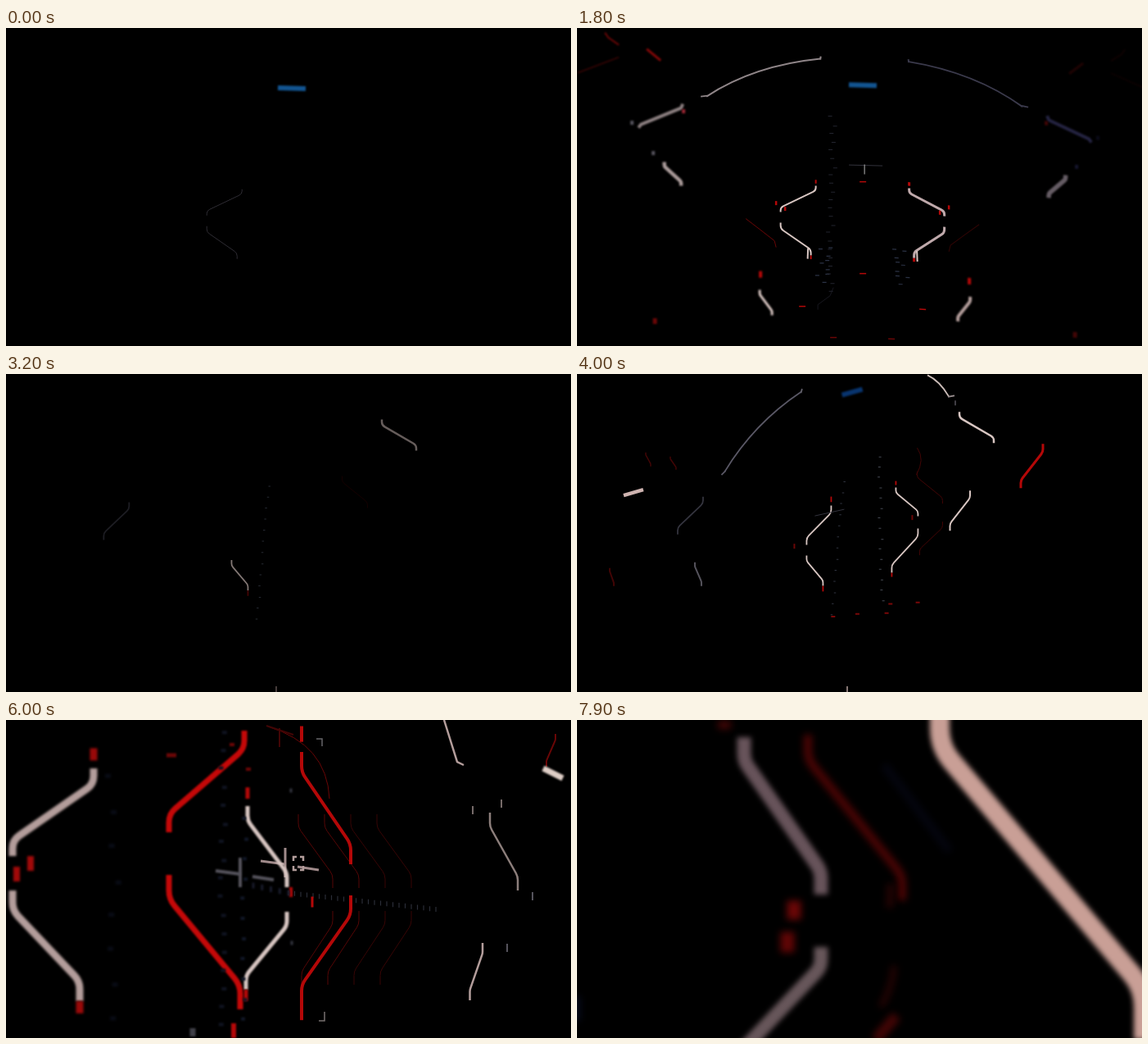
Write an HTML page with a canvas that moves like this. It is 690 by 388 pixels and loops after 8 s.

```html
<!DOCTYPE html>
<html lang="en">
<head>
<meta charset="utf-8">
<title>Light lines</title>
<style>
html, body { margin: 0; width: 100%; height: 100%; overflow: hidden; background: #000; }
canvas { display: block; }
</style>
</head>
<body>
<canvas id="stage" width="690" height="388"></canvas>
<script>
const ctx = document.getElementById('stage').getContext('2d');
const LOOP = 8000, STEP = 100;
const RED = '#b40808', DARK = '#6a0606', DIM = '#420505';
const PINK = '#d8c6c2', ROSE = '#b39d9b', GREY = '#55535c', NAVY = '#141b33', BLUE = '#125490';

let time = 0, piece = 0, wake = [0, 0], bend = 0.18;

const noise = n => { const v = Math.sin(n * 127.1 + 11.7) * 43758.5453; return v - Math.floor(v); };
const clamp = v => Math.max(0, Math.min(1, v));

// Each piece lights up at its own moment inside the wake window, with a short flicker.
function glow() {
  const n = ++piece;
  const age = time - (wake[0] + noise(n) * (wake[1] - wake[0]));
  if (age < 0) return 0;
  const flick = age < 250 ? 0.5 + 0.5 * noise(n + age / STEP) : 1;
  return clamp((age + 60) / 200) * flick;
}

// A depth layer: drifts by (vx, vy) per second and passes its pose at ref.
function layer(ref, vx, vy, soft, draw) {
  const s = (time - ref) / 1000;
  ctx.save();
  ctx.translate(vx * s, vy * s);
  ctx.filter = soft ? `blur(${soft}px)` : 'none';
  draw();
  ctx.restore();
}

// Draws side 0, then its reflection as side 1; skew lowers what lies far from the axis.
function mirror(axis, skew, draw) {
  draw(0);
  ctx.save();
  ctx.transform(-1, -skew, 0, 1, 2 * axis, skew * axis);
  draw(1);
  ctx.restore();
}

function stroke(w, color, trace) {
  ctx.globalAlpha = glow();
  ctx.lineWidth = w;
  ctx.strokeStyle = color;
  ctx.beginPath();
  trace();
  ctx.stroke();
}

function line(w, color, ...p) {
  stroke(w, color, () => { for (let i = 0; i < p.length; i += 2) ctx.lineTo(p[i], p[i + 1]); });
}

function arc(x0, y0, cx, cy, x1, y1, w, color) {
  stroke(w, color, () => { ctx.moveTo(x0, y0); ctx.quadraticCurveTo(cx, cy, x1, y1); });
}

// Upright stub, slanted run, upright stub.
function zig(x0, y0, x1, y1, w, color) {
  const s = (y1 - y0) * bend, r = Math.abs(s);
  stroke(w, color, () => {
    ctx.moveTo(x0, y0);
    ctx.arcTo(x0, y0 + s, x1, y1 - s, r);
    ctx.arcTo(x1, y1 - s, x1, y1, r);
    ctx.lineTo(x1, y1);
  });
}

// Two zigs meeting at a tip, reaching (ux, uy) upwards and (lx, ly) downwards.
function bracket(x, y, gap, ux, uy, lx, ly, w, color, tip) {
  zig(x + ux, y - gap - uy, x, y - gap, w, color);
  zig(x, y + gap, x + lx, y + gap + ly, w, color);
  if (!tip) return;
  const h = uy * 0.14;
  dot(x + ux, y - gap - uy * 1.16, w, h, tip);
  dot(x + lx, y + gap + ly + h / 2, w, h, tip);
}

function dot(x, y, w, h, color) {
  ctx.globalAlpha = glow();
  ctx.fillStyle = color;
  ctx.fillRect(x - w / 2, y - h / 2, w, h);
}

// Marks strung between two points, loosened by a seeded spread.
function row(x0, y0, x1, y1, count, w, h, color, spread = 0) {
  ctx.globalAlpha = glow();
  ctx.fillStyle = color;
  ctx.beginPath();
  for (let i = 0; i < count; i++) {
    const k = i / (count - 1), off = (noise(i + x0) - 0.5) * spread;
    ctx.rect(x0 + (x1 - x0) * k + off - w / 2, y0 + (y1 - y0) * k + off / 3 - h / 2, w, h);
  }
  ctx.fill();
}

function wide() {
  const ref = 1200, vx = 1.9, vy = -2.3;
  wake = [-400, -300];
  layer(ref, 0, -2, 1.2, () => line(6, BLUE, 332, 70.5, 366, 71.5));
  const arms = (w, color, tip) => bracket(247.5, 232.5, 6.5, 43, 32, 37, 40, w, color, tip);
  if (time < 300) {
    layer(ref, vx, vy, 0, () => arms(0.7, '#42404a'));
    return;
  }
  wake = [300, 950];
  layer(ref, vx, vy, 0.4, () => {
    mirror(347.5, 0.05, side => {
      arms(2 + side, [PINK, '#bfa9ab'][side], RED);
      dot(242, 215, 2.5, 5, RED);
      dot(253, 222, 2.5, 5, RED);
      line(2, PINK, 281, 270, 280.5, 283);
      line(1, side ? '#300404' : DARK, 205, 234, 222, 247, 240, 261, 242, 269);
      dot(274, 341, 8, 1.5, RED);
      dot(312, 379, 8, 1.5, DARK);
      row(304, 268, 296, 310, 9, 5, 1.2, '#2b3245', 14);
    });
    mirror(350, 0.065, side => {
      const color = ['#8f8588', '#3b3a4c'][side];
      line(2, color, 296.5, 36, 296, 40);
      arc(296, 39, 215, 47, 157, 85, 2, color);
      line(2, color, 158, 84, 150, 85);
    });
    dot(348, 189, 8, 1.5, RED);
    dot(348, 301, 8, 1.5, RED);
    line(1, '#33333c', 331, 168.5, 372, 169.5);
    line(1.2, '#999', 350, 168, 350, 180);
    row(311, 110, 307, 322, 22, 5, 1, '#23252f', 9);
    line(0.7, '#22222b', 312, 318, 308, 328, 293, 339, 293, 345);
  });
  layer(ref, vx, vy, 0.9, () => mirror(350.5, 0.065, side => {
    line(4, ['#8b7f80', '#242341'][side], 128, 94, 126, 99, 77, 119, 74, 123);
    zig(105.5, 165, 126, 194, 4.5 + side, ['#a99a99', '#655c64'][side]);
    zig(222, 321, 237, 352, 3 + side, [PINK, ROSE][side]);
    dot(66, 117, 4, 5, [GREY, '#0a0a18'][side]);
    dot(92, 154, 4, 5, [GREY, '#15152c'][side]);
    dot(129, 103, 4, 5, ['#9a2633', DIM][side]);
    dot(223, 302, 4, 8, RED);
    dot(94, 359, 5, 7, [DARK, DIM][side]);
    line(2, [DARK, '#100202'][side], 33, 7, 37, 13, 50, 22);
    line(3, ['#820707', '#200303'][side], 84, 27, 101, 41);
    line(1.5, [DIM, '#100202'][side], 50, 37, 0, 56);
  }));
}

function frontal() {
  const axis = 346.5, zoom = 1 + (time - 2300) * 0.000025;
  wake = [1850, 2150];
  ctx.save();
  ctx.translate(axis, 190);
  ctx.scale(zoom, zoom);
  ctx.translate(-axis, -190);
  layer(2300, 0, 0, 1.6, () => mirror(axis, 0, side => {
    line(7, '#c9b5ad', 91, 163.5, 124, 163.5);
    line(8, '#c3aeaa', -10, 216, 47, 222, 38, 240);
    dot(109, 193, 8, 7, '#990808');
    dot(117, 294, 20, 5, '#07152c');
    dot(22, 243, 10, 14, '#250404');
    arc(50, 280, 86, 284, 81, 300, 3, '#250404');
  }));
  layer(2300, 0, 0, 0.8, () => {
    mirror(axis, 0, side => {
      zig(229, 189, 124, 242, 4.5, ['#95888b', '#cdb8b5'][side]);
      zig(111, 258, 187, 325, 5.5, '#c4b0ac');
      dot(229, 191, 5, 6, RED);
      dot(127, 233, 6, 6, RED);
      dot(183, 306, 6, 7, RED);
    });
    arc(533, 312, 662, 310, 690, 282, 2, DIM);
    arc(612, 296, 600, 286, 677, 240, 2, DIM);
  });
  layer(2300, 0, 0, 0.3, () => {
    line(1.6, '#e5e5e5', axis, 79, axis, 90);
    row(axis, 53, axis, 117, 4, 1.5, 2, '#666');
    line(1, '#222a48', 358, 72.5, 393, 72.5);
    dot(axis, 177, 13, 1.6, RED);
    mirror(axis, 0, side => {
      dot(276, 170, 6, 1.5, DIM);
      const color = ['#20294a', '#727b8b'][side];
      for (const y of [208, 221, 237, 273, 294, 319]) dot(265 - (y - 237) * 0.2, y + 0.5, 11, 1.2, color);
      row(243, 232, 249, 232, 3, 1, 5, [NAVY, '#505868'][side]);
      row(235, 270, 241, 270, 3, 1, 5, [NAVY, '#505868'][side]);
      dot(174, 365, 5, 4, RED);
      dot(232, 352, 5, 7, RED);
    });
    row(174, 355, 518, 355, 24, 1.5, 4, '#850808');
    dot(axis, 373, 5, 3, RED);
  });
  ctx.restore();
}

function tilted() {
  const ref = 4900, first = [3000, 3750], second = [4150, 4600];
  wake = first;
  layer(ref, 6, -8, 1, () => line(6, '#08346e', 329, 18.5, 354, 11.5));
  layer(ref, 6.2, -6.8, 0.3, () => {
    wake = first;
    bracket(286, 209, 6.5, 30, 48, 20, 37, 1.8, PINK, RED);
    bracket(422, 175, 7.5, -27, 35, -32, 54, 1.8, PINK, RED);
    arc(279, 16, 222, 54, 186, 113, 1.8, '#5a5866');
    line(1.8, '#62606a', 280.5, 12, 279, 17);
    line(1.8, '#5a5866', 187, 112, 182, 117);
    line(1, '#33333d', 296, 167, 332, 159);
    dot(271, 204, 2, 6, DARK);
    dot(415, 169, 2, 6, DARK);
    row(322, 291, 423, 273, 5, 5, 2, '#780808', 30);
    bracket(452, 163, 11, -31, 39, -28, 41, 1, DIM);
    arc(421, 84, 431, 98, 420, 117, 1, DIM);
    row(331, 125, 318, 288, 13, 2.5, 1, '#303440', 3);
    row(375, 95, 378, 270, 15, 3, 1, '#454953', 4);
    wake = second;
    bracket(358, 136, 9, -27, 36, -38, 58, 2.5, RED);
    bracket(240, 169.5, 8.5, 35, 52, 19.5, 39, 2.5, RED);
    arc(444, 84, 428, 106, 420, 116, 1, DIM);
    row(262, 324, 370, 290, 18, 4, 1.2, '#3a4354', 16);
  });
  layer(ref, 10, -11.5, 0.4, () => {
    wake = first;
    arc(437, -9, 452, -2, 463, 17, 1.8, '#cbbcb8');
    line(1.8, '#9c9192', 462, 17.5, 470, 16);
    zig(476, 36, 518, 74, 2.5, PINK);
    zig(578, 75, 551, 129, 3, RED);
    zig(489, 132, 464.5, 181, 2, PINK);
    dot(471, 25, 1.5, 6, GREY);
    wake = second;
    for (const [x, y] of [[481, 41], [516, 70], [492, 125.5]]) dot(x, y, 2, 6, ROSE);
    zig(635, 99, 607, 156, 1, DIM);
    row(562, 61, 571, 58, 2, 3, 5, NAVY);
  });
  layer(ref, 4.5, -8.5, 0.7, () => {
    wake = first;
    line(4.5, '#ceb3b0', 61, 140.5, 85, 133.5);
    zig(88, 88, 94, 105, 1.5, DIM);
    zig(118, 93, 125, 109, 1.5, DIM);
    zig(44, 229, 49, 251, 2, DIM);
    zig(158, 142, 127, 188, 1.8, '#34343e');
    zig(148, 222, 156, 251, 2, GREY);
    wake = second;
    row(168, 138, 120, 215, 4, 2, 4, '#3b3b44', 16);
    dot(5, 161, 14, 4, DIM);
  });
  wake = first;
  if (time < 4300) dot(330, 385, 1.5, 8, ROSE);
  wake = second;
  layer(ref, 8, -13, 0.4, () => {
    zig(368, 355, 354, 390, 2, PINK);
    zig(202, 374, 206, 396, 2, ROSE);
    zig(293, 329, 303, 357, 1.3, DIM);
    dot(317, 327, 2, 8, PINK);
    dot(223, 340, 2.5, 7, ROSE);
    dot(363, 341, 2, 8, RED);
    dot(196, 362, 3, 5, DIM);
  });
}

function cross(x, y, w, color) {
  line(w, color, x - 30, y - 4, x, y);
  line(w, color, x + 15, y + 3, x + 41, y + 7);
  line(w, color, x, y - 20, x, y + 16);
}

function corner(x, y, dx, dy, w, color) {
  line(w, color, x + dx, y, x, y, x, y + dy);
}

function sideways() {
  const ref = 6000;
  wake = [5400, 5750];
  layer(ref, 10, 1, 0.3, () => {
    for (let i = 0; i < 4; i++)
      bracket(399 + 32 * i, 219, 14, -42, 90, -38, 90, 1, i < 2 ? '#560606' : '#380505');
    arc(320, 8, 392, 30, 395, 96, 1, DARK);
    line(2, DIM, 318, 7, 351, 18);
    line(2, DIM, 334, 10, 334, 33);
    row(345, 211, 525, 231, 25, 1.2, 6, '#2a2d37');
    corner(386, 23, -7, 9, 1.5, '#67666a');
    corner(389, 367, -7, -11, 1.5, '#77706f');
  });
  layer(ref, 16, 0, 0.5, () => {
    line(2.5, ROSE, 535, 0, 551, 51, 559, 55);
    zig(591, 113, 625, 208, 2.5, '#8c7e7b');
    zig(582, 272, 566.5, 342, 2.5, ROSE);
    row(570, 110, 605, 102, 2, 2, 10, '#766a69');
    row(612, 278, 643, 215, 2, 2, 10, GREY);
    zig(671, 17, 660, 57, 2, DARK);
  });
  layer(ref, 16, 0, 1, () => line(7, '#dfcfc7', 656, 59, 680, 71));
  layer(ref, 18, 0, 0.6, () => {
    bracket(421, 195, 19, -60, 137, -60, 133, 4, RED, RED);
    dot(374, 222, 3, 13, RED);
    cross(341, 176, 3, '#a08a8a');
    for (const sx of [-1, 1]) for (const sy of [-1, 1])
      corner(357 + sx * 6, 175 + sy * 8, -sx * 4, -sy * 5, 2.5, ROSE);
  });
  layer(ref, 25, 0, 0.8, () => {
    bracket(343, 219, 15, -48, 99, -50, 95, 5, PINK, RED);
    dot(348, 210, 4, 12, RED);
    cross(286, 188, 4, GREY);
    row(348, 86, 349, 272, 2, 3, 5, '#343640');
  });
  layer(ref, 35, 0, 1.3, () => {
    bracket(199, 163, 26, 92, 124, 87, 164, 7, '#c40808');
    dot(278, 379, 6, 18, RED);
    dot(202, 43, 12, 5, DARK);
    row(276, 30, 296, 60, 2, 6, 4, DARK);
    row(266, 15, 264, 372, 17, 6, 4, '#0f1320', 7);
    row(291, 120, 290, 365, 11, 5, 4, '#101626', 6);
    row(302, 202, 345, 211, 5, 3, 7, '#181b2b');
    dot(228, 381, 7, 10, '#404048');
  });
  layer(ref, 50, 0, 1.7, () => {
    bracket(8, 187, 21, 99, 107, 82, 135, 9, ROSE, '#990909');
    row(13, 188, 30, 175, 2, 8, 18, '#a10909');
    row(130, 70, 134, 365, 8, 7, 5, '#080b15', 14);
  });
}

function close() {
  const ref = 7900, vx = 18, vy = -8;
  wake = [7450, 7600];
  bend = 0.15;
  layer(ref, vx, vy, 4, () => {
    line(10, '#04050f', 375, 55, 455, 160);
    dot(-3, 352, 14, 30, '#060a1c');
    zig(282, 18, 397, 220, 10, '#4c0404');
    line(9, '#240303', 383, 200, 382, 229);
    arc(387, 300, 386, 325, 371, 350, 8, '#220303');
    line(13, DIM, 390, 361, 365, 390);
    dot(265, 232, 17, 23, DARK);
    dot(257, 271, 17, 25, '#600505');
    dot(180, 6, 16, 10, DIM);
  });
  layer(ref, vx, vy, 3, () => {
    zig(204, 21, 298, 213, 17, '#67535a');
    zig(298, 277, 190, 440, 17, '#67565a');
    zig(443, -30, 692, 390, 24, '#c99f96');
  });
}

// The gaps between shots stay black.
const shots = [
  [0, 1900, wide],
  [1900, 2800, frontal],
  [3000, 5400, tilted],
  [5400, 7200, sideways],
  [7500, 8000, close]
];

function render(t) {
  time = t;
  piece = 0;
  bend = 0.18;
  ctx.globalAlpha = 1;
  ctx.fillStyle = '#000';
  ctx.fillRect(0, 0, 690, 388);
  const shot = shots.find(([from, to]) => t >= from && t < to);
  if (shot) shot[2]();
}

const start = performance.now();
let last = -1;
function tick() {
  const t = Math.floor((performance.now() - start) % LOOP / STEP) * STEP;
  if (t !== last) render(last = t);
  requestAnimationFrame(tick);
}
tick();
</script>
</body>
</html>
```
